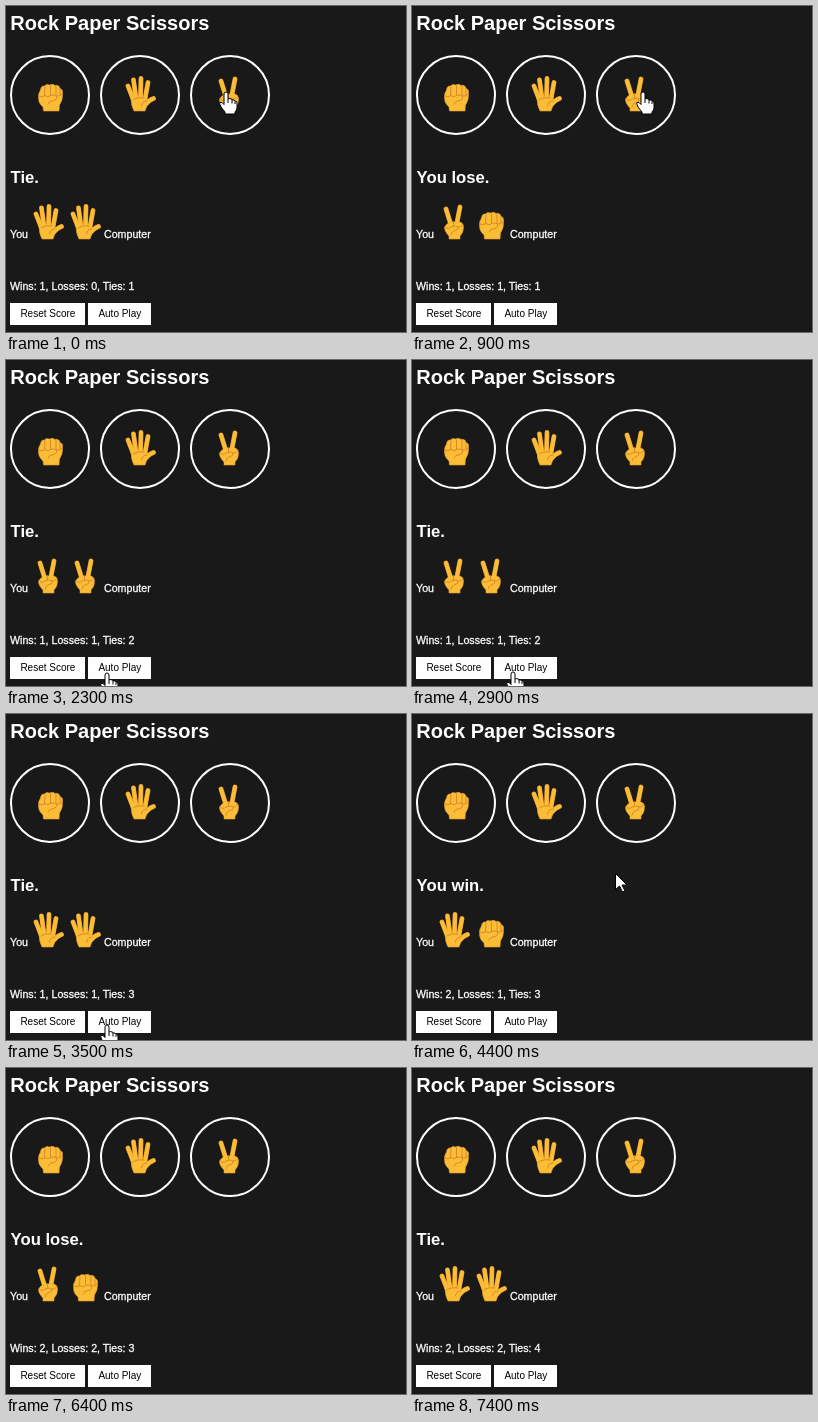
Animation, 400 px wide and 326 px high, one loop 7500 ms. Source, as an HTML page:

```html
<!DOCTYPE html>
<html lang="en">
<head>
<meta charset="utf-8">
<title>Rock Paper Scissors</title>
<style>
  html, body { margin: 0; width: 100%; height: 100%; overflow: hidden; background: #191919; }
  svg { display: block; width: 400px; height: 326px; font-family: "Liberation Sans", Arial, sans-serif; font-size: 10.67px; fill: #fff; }
  .ring { fill: none; stroke: #fff; stroke-width: 2; }
  .small { stroke: #fff; stroke-width: .3; }
  .button { font-size: 10px; fill: #000; }
  .skin { fill: #fbbd35; stroke: #e39a2e; stroke-width: .6; stroke-linejoin: round; }
  .edge, .finger, .crease { fill: none; stroke-linecap: round; stroke-linejoin: round; }
  .edge { stroke: #e39a2e; stroke-width: 4.8; }
  .finger { stroke: #fbbd35; stroke-width: 3.8; }
  .crease { stroke: #d78a2a; stroke-width: 1; }
  #cursor path { fill: #fff; stroke: #000; stroke-width: 1; stroke-linejoin: round; }
</style>
</head>
<body>
<svg viewBox="0 0 400 326">
  <defs>
    <g id="rock">
      <path class="skin" d="M-9.5-4Q-9-8.5-5.5-8Q-4-10.500-.5-9Q3-10.500 5-8.500Q9-9.500 10-5.500Q13-5 12.500-1Q13 6 9.500 11L9 17H-6.500L-7 13Q-12 9-11.500 3Q-12 0-9.500-4Z"/>
      <path class="crease" d="M-5-7L-5.500 1M.5-8V1M6-7.500V1M10-5V1M-11 2Q-8 4-5 1.500Q-2 4 .5 1.500Q4 0 6.500 2Q8 5 4 6.500Q-1 6.500-2 10M6.500 2Q10 3 12 0"/>
    </g>
    <path id="spread" d="M-12-8L-7 5M-6.500-14L-4 4M1-15.500L.5 4M8-11.500L5 5M13.500 4.500Q9 6 5 11"/>
    <path id="vee" d="M-8-13L-3 3M6-15L2.500 3"/>
    <g id="paper">
      <use href="#spread" class="edge"/>
      <path class="skin" d="M-9 3L6.500 3L7 8Q7 13 5 17H-6Q-9 12-9 3Z"/>
      <use href="#spread" class="finger"/>
      <path class="crease" d="M7 7Q2 7 1.500 12M-7 6Q-3 3 4 4"/>
    </g>
    <g id="scissors">
      <use href="#vee" class="edge"/>
      <path class="skin" d="M-7 2Q-3-1 1 0H6Q9.500 1 9.500 5Q9.500 11 6 14V17H-5V14Q-10 9-9.500 5Z"/>
      <use href="#vee" class="finger"/>
      <path class="crease" d="M-8.500 5Q-6 8-3 5Q2 3 4 5Q5 8 0 9Q-3 10-3 13M-.5 0V3.500M4 5Q7 6 8.500 3"/>
    </g>
  </defs>

  <text x="4.300" y="24" font-size="20" font-weight="bold">Rock Paper Scissors</text>
  <circle class="ring" cx="44" cy="89" r="39"/>
  <circle class="ring" cx="134" cy="89" r="39"/>
  <circle class="ring" cx="224" cy="89" r="39"/>
  <use href="#rock" x="44" y="88"/>
  <use href="#paper" x="134" y="88"/>
  <use href="#scissors" x="223" y="88"/>

  <text id="result" x="4.600" y="177" font-size="16.67" font-weight="bold"></text>
  <text class="small" x="4" y="232">You</text>
  <use id="you" x="42" y="216"/>
  <use id="computer" x="79" y="216"/>
  <text class="small" x="98" y="232">Computer</text>
  <text class="small" id="score" x="4" y="284"></text>

  <rect x="4" y="297" width="75" height="22"/>
  <rect x="82" y="297" width="63" height="22"/>
  <text class="button" x="14.400" y="311">Reset Score</text>
  <text class="button" x="92.400" y="311">Auto Play</text>

  <g id="cursor">
    <path id="arrow" d="M0 0V16L4 12.500L7 18.500L9.500 17.500L6.500 11.500H11.500Z"/>
    <g id="pointer">
      <path d="M-2 2Q-2 0 0 0Q2 0 2 2V7Q3 6 5 7Q6 7 6 8Q8 7.500 9 9Q11 9 11 11V16Q11 18 9 20V22H-1V20L-5 15Q-7 11-6 10.500Q-4 9.500-2 12.500Z"/>
      <path style="fill:none" d="M2 7V11M6 8V11.500M9 9.500V12"/>
    </g>
  </g>
</svg>
<script>
const LOOP = 7500, STEP = 100;
const $ = id => document.getElementById(id);

// start time, player's hand, computer's hand, result, wins, losses, ties
const rounds = [
  [0, "paper", "paper", "Tie.", 1, 0, 1],
  [400, "scissors", "rock", "You lose.", 1, 1, 1],
  [1300, "scissors", "scissors", "Tie.", 1, 1, 2],
  [3300, "paper", "paper", "Tie.", 1, 1, 3],
  [4300, "paper", "rock", "You win.", 2, 1, 3],
  [5400, "scissors", "rock", "You lose.", 2, 2, 3],
  [6500, "paper", "paper", "Tie.", 2, 2, 4]
];

// time, x, y of the cursor's tip
const track = [
  [0, 220, 86], [300, 220, 86], [800, 231, 86], [1400, 231, 86], [1700, 222, 97],
  [2200, 101, 313], [2700, 101, 313], [3100, 101, 311], [3600, 101, 311],
  [4100, 188, 194], [4700, 219, 125], [5400, 219, 125], [5700, 230, 104],
  [6200, 372, -28], [LOOP, 372, -28]
];

function cursorAt(t) {
  const i = track.findIndex(p => p[0] > t);
  const [t0, x0, y0] = track[i - 1], [t1, x1, y1] = track[i];
  const u = (t - t0) / (t1 - t0), k = u * u * (3 - 2 * u);
  return [x0 + (x1 - x0) * k, y0 + (y1 - y0) * k];
}

function clickable(x, y) {
  const onRing = [44, 134, 224].some(cx => Math.hypot(x - cx, y - 89) <= 40);
  return onRing || (y >= 297 && y <= 319 && x >= 4 && x <= 145);
}

function draw(now) {
  const t = Math.floor(now % LOOP / STEP) * STEP;
  const [, you, computer, result, wins, losses, ties] = rounds.filter(r => r[0] <= t).pop();
  $("you").setAttribute("href", "#" + you);
  $("computer").setAttribute("href", "#" + computer);
  $("result").textContent = result;
  $("score").textContent = `Wins: ${wins}, Losses: ${losses}, Ties: ${ties}`;

  const [x, y] = cursorAt(t), hand = clickable(x, y);
  $("cursor").setAttribute("transform", `translate(${x} ${y})`);
  $("pointer").style.display = hand ? "" : "none";
  $("arrow").style.display = hand ? "none" : "";
}

let start;
function tick(now) {
  start ??= now;
  draw(now - start);
  requestAnimationFrame(tick);
}
draw(0);
requestAnimationFrame(tick);
</script>
</body>
</html>
```
